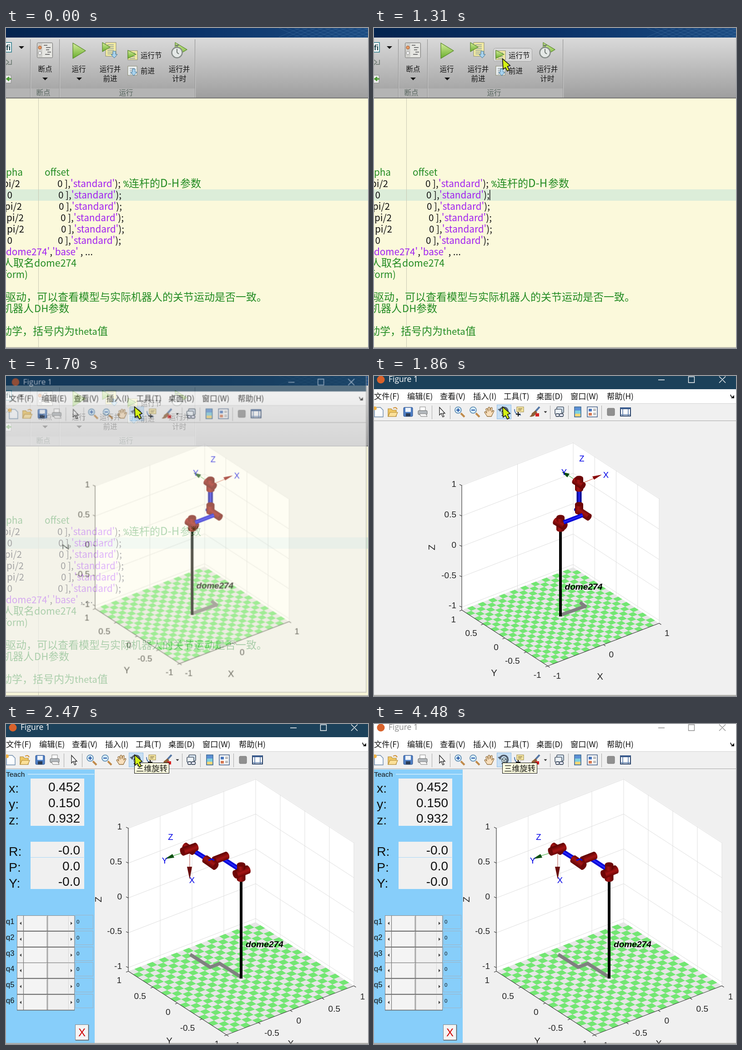
These frames come from a looping animation (796 by 704 pixels, 4630 ms). An HTML page:

```html
<!DOCTYPE html>
<html lang="zh">
<head>
<meta charset="utf-8">
<title>Robot teach panel</title>
<style>
html, body { margin: 0; width: 100%; height: 100%; overflow: hidden; background: #fbf9db; }
svg { display: block; width: 796px; height: 704px; }
text { font-family: "Noto Sans CJK SC", "Noto Sans CJK", sans-serif; white-space: pre; }
.code text { font-weight: 300; }
.ar, .ar text { font-family: "Liberation Sans", Arial, sans-serif; }
.ui { font-family: "Open Sans", sans-serif; }
.mono { font-family: "Noto Sans Mono", monospace; }

.anim { animation: 4630ms step-end infinite; }
#ibeam { animation-name: ibeam; }
#arrow { animation-name: arrow; }
#hover { animation-name: hover; }
#press { animation-name: press; }
#caret { animation-name: caret; }
#fig { animation-name: open; transform-origin: 365px 320px; }
#before { animation-name: before; }
#after { animation-name: after; }
#sliders { animation-name: sliders; }
#tip { animation-name: tip; }
#inactive { animation-name: inactive; }

@keyframes ibeam {
  0% { opacity: 0; transform: translate(648px, 643px); }
  6.47% { opacity: 1; transform: translate(648px, 643px); }
  8.11% { opacity: 1; transform: translate(513px, 441px); }
  9.75% { opacity: 1; transform: translate(437px, 328px); }
  11.39% { opacity: 1; transform: translate(335px, 190px); }
  13.03%, 100% { opacity: 0; transform: translate(335px, 190px); }
}
@keyframes arrow {
  0% { opacity: 0; transform: translate(303px, 108px); }
  13.03% { opacity: 1; transform: translate(303px, 108px); }
  14.68% { opacity: 1; transform: translate(281px, 75px); }
  19.64% { opacity: 1; transform: translate(282px, 70px); }
  21.37% { opacity: 1; transform: translate(282px, 67px); }
  68.24% { opacity: 1; transform: translate(318px, 114px); }
  69.92% { opacity: 1; transform: translate(400px, 222px); }
  71.6% { opacity: 1; transform: translate(520px, 377px); }
  73.29% { opacity: 1; transform: translate(640px, 530px); }
  74.97% { opacity: 1; transform: translate(720px, 633px); }
  76.66%, 100% { opacity: 0; transform: translate(720px, 633px); }
}
@keyframes hover { 0% { opacity: 0 } 19.64% { opacity: 1 } 35.19%, 100% { opacity: 0 } }
@keyframes press { 0% { opacity: 0 } 24.61% { opacity: 1 } 28.28%, 100% { opacity: 0 } }
@keyframes caret { 0% { opacity: 0 } 24.61% { opacity: 1 } 35.19%, 100% { opacity: 0 } }
@keyframes open {
  0% { opacity: 0; transform: scale(.94); }
  35.19% { opacity: .25; transform: scale(.95); }
  36.7% { opacity: .67; transform: scale(.983); }
  38.43% { opacity: .95; transform: scale(.997); }
  40.16%, 100% { opacity: 1; transform: scale(1); }
}
@keyframes before { 0% { opacity: 1 } 41.67%, 100% { opacity: 0 } }
@keyframes after { 0% { opacity: 0 } 41.67%, 100% { opacity: 1 } }
@keyframes sliders { 0% { opacity: 0 } 43.4%, 100% { opacity: 1 } }
@keyframes tip { 0% { opacity: 0 } 53.33%, 100% { opacity: 1 } }
@keyframes inactive { 0% { opacity: 0 } 96.75%, 100% { opacity: 1 } }
</style>
</head>
<body>
<svg id="stage" viewBox="0 0 796 704">
  <defs>
    <linearGradient id="sky"><stop offset="0" stop-color="#04244f"/><stop offset=".5" stop-color="#0a3268"/><stop offset="1" stop-color="#1c4c82"/></linearGradient>
    <linearGradient id="ribbon" x2="0" y2="1"><stop offset="0" stop-color="#dadada"/><stop offset="1" stop-color="#9e9e9e"/></linearGradient>
    <linearGradient id="leaf" x2="0" y2="1"><stop offset="0" stop-color="#d6ee9c"/><stop offset="1" stop-color="#68ad2c"/></linearGradient>
    <linearGradient id="tube" x2="0" y2="1"><stop offset="0" stop-color="#6a0404"/><stop offset=".4" stop-color="#a31414"/><stop offset="1" stop-color="#5c0202"/></linearGradient>
  </defs>
  <g id="editor"></g>
  <g id="fig" class="anim"></g>
  <g id="ibeam" class="anim"><path d="M-8-14H-2L0-12 2-14H8M0-12V12M-8 14H-2L0 12 2 14H8" fill="none" stroke="#222" stroke-width="2"/></g>
  <g id="arrow" class="anim"><path d="M.5.5 2 24 7 20 11 28 15.5 25.5 11.5 17.5 17.5 15.5Z" fill="#d3f014" stroke="#111" stroke-width="1.6" stroke-linejoin="round"/></g>
</svg>
<script>
const $ = id => document.getElementById(id);
const rect = (x, y, w, h, fill, more = '') => `<rect x="${x}" y="${y}" width="${w}" height="${h}" fill="${fill}" ${more}/>`;
const path = (d, stroke, w = 1, fill = 'none', more = '') => `<path d="${d}" fill="${fill}" stroke="${stroke}" stroke-width="${w}" ${more}/>`;
const fill = (d, color) => path(d, 'none', 0, color);
const dot = (x, y, r, color, more = '') => `<circle cx="${x}" cy="${y}" r="${r}" fill="${color}" ${more}/>`;
const text = (x, y, s, size, color = '#111', more = '') => `<text x="${x}" y="${y}" font-size="${size}" fill="${color}" ${more}>${s}</text>`;
const group = (id, body, more = '') => `<g id="${id}" class="anim ${more}">${body}</g>`;
const move = (x, y, body) => `<g transform="translate(${x} ${y})">${body}</g>`;
const MID = 'text-anchor="middle"', END = 'text-anchor="end"';
const GREEN = '#228b22', PURPLE = '#a020f0', NAME = 'dome274';

// ---- editor window ----
const play = (x, y, w, h) => path(`M${x} ${y}l${w} ${h / 2}l${-w} ${h / 2}z`, '#5b8a2c', 1.3, 'url(#leaf)', 'stroke-linejoin="round"');
const down = (x, y) => fill(`M${x - 6} ${y - 3}h12l-6 6z`, '#111');
const page = (x, y, w, h, color) => {
  let lines = '';
  for (let i = 5; i < h - 2; i += 4) lines += `M${x + 4} ${y + i}h${w - 9}`;
  return rect(x, y, w, h, color, 'stroke="#8a8a70"') + path(lines, '#8d9aa0', 1.4);
};
const dive = (x, y) => path(`M${x - 3} ${y - 8}h6v7h4l-7 8l-7-8h4z`, '#3f7396', 1, '#a9d3ee');

function ribbon() {
  let s = rect(0, 0, 796, 21, 'url(#sky)');
  let net = '';
  for (let x = 600; x < 800; x += 17) net += `M${x} 20l46-20M${x} 0l46 20`;
  s += path(net, '#8db8e0', .7, 'none', 'opacity=".25"');
  s += rect(0, 21, 796, 133, 'url(#ribbon)') + rect(0, 133, 415, 20, '#b4b4b4');
  s += path('M53.5 25V153M117.5 25V153M415.5 25V153', '#929292') + path('M54.5 25V153M118.5 25V153M416.5 25V153', '#cfcfcf');
  s += rect(0, 153, 796, 2, '#757575');

  s += rect(-12, 32, 24, 21, '#fff', 'stroke="#2f7d8c" stroke-width="1.6"') + text(0, 49, 'fi', 15, '#143c44', 'font-weight="700"');
  s += down(34, 43) + path('M0 70l6 5-6 6M12 70v10H4', '#7c8680', 2) + rect(-6, 104, 17, 17, '#eee', 'stroke="#888"');
  s += path('M12 112H4M7 108l-5 4 5 4', '#4b9a32', 3);

  s += rect(68.5, 32.5, 34, 33, '#d0d0cc', 'rx="2" stroke="#777"') + rect(80, 34, 21, 30, '#e6e6e2');
  s += dot(74.5, 43, 3.5, '#e89a62', 'stroke="#9a4a22"') + dot(74.5, 55, 3.5, '#f4f4f4', 'stroke="#888"');
  s += path('M83 38h8M88 43h10M88 48h7M91 53h8M86 58h10', '#777', 1.8);
  s += play(147, 33, 28, 34);
  s += page(219, 32, 23, 30, '#f3eca2') + play(212, 32, 17, 20) + dive(238, 59);
  s += page(268, 50, 21, 20, '#f3eca2') + play(268, 49, 18, 18);
  s += page(268, 84, 20, 20, '#edf2f4') + dive(281, 98);
  s += play(372, 32, 26, 31) + dot(376, 54, 11.5, '#e4e8e6', 'stroke="#858b88" stroke-width="2.4"');
  s += path('M376 54V46M376 54l4 3M376 42v-4M372 38h8', '#68706c', 1.8);

  const label = (x, y, t) => text(x, y, t, 15.5, '#111', MID);
  s += label(86, 96, '断点') + label(160, 96, '运行') + label(229, 96, '运行并') + label(229, 117, '前进');
  s += label(381, 96, '运行并') + label(381, 117, '计时') + down(86, 112) + down(161, 112);
  s += text(82, 148, '断点', 15.5, '#58665f', MID) + text(264, 148, '运行', 15.5, '#58665f', MID);
  const button = page(268, 50, 21, 20, '#f3eca2') + play(268, 49, 18, 18);
  const frame = c => rect(262.5, 44.5, 85, 29, c, 'rx="5" stroke="#a2a2a2"') + button;
  s += group('hover', frame('#d9d9d9')) + group('press', frame('#b9bcbd'));
  return s + text(296, 66, '运行节', 15.5) + text(296, 100, '前进', 15.5);
}

function code() {
  const latin = (x, y, t, c = '#111', more = '') => text(x, y, t, 20.7, c, more);
  const han = (x, y, t) => text(x, y, t, 23, GREEN);
  let s = rect(0, 155, 796, 549, '#fbf9db') + rect(0, 355, 796, 25, '#dcedd9');
  s += path('M71.5 155V702', '#c9c8b4') + rect(0, 702, 796, 2, '#b9b8ad');
  s += latin(37, 325, 'alpha', GREEN, END) + latin(85, 325, 'offset', GREEN);
  const rows = [['pi/2', 31, 113], ['0', 14, 115], ['pi/2', 35, 116], ['pi/2', 39, 120], ['pi/2', 40, 121], ['0', 14, 114]];
  rows.forEach(([a, end, x], i) => {
    s += latin(end, 350 + 25 * i, a, '#111', END);
    s += latin(x, 350 + 25 * i, `0 ],<tspan fill="${PURPLE}">'standard'</tspan>);`);
  });
  s += text(258, 350, '%', 20.5, GREEN, 'class="mono"') + han(270, 350, '连杆的') + text(339, 350, 'D-H', 24, GREEN) + han(383, 350, '参数');
  s += latin(0, 500, `<tspan fill="${PURPLE}">${NAME}'</tspan>,<tspan fill="${PURPLE}">'base'</tspan> , ...`);
  s += han(-7, 525, '人取名') + text(62, 525, NAME, 21.3, GREEN) + latin(48, 550, 'transform)', GREEN, END);
  s += han(-1, 600, '驱动，可以查看模型与实际机器人的关节运动是否一致。');
  s += han(-8, 625, '机器人') + text(62, 625, 'DH', 22, GREEN) + han(93, 625, '参数');
  s += han(-10, 675, '动学，括号内为') + text(151, 675, 'theta', 20.3, GREEN) + han(201, 675, '值');
  return `<g class="code">${s}</g>` + group('caret', rect(254, 356, 1.5, 23, '#111'));
}

// ---- figure window ----
const title = (bg, ink) => rect(-20, -14, 820, 43, bg) + dot(15, 8, 8.5, '#d9622b')
  + text(32, 13, 'Figure 1', 17.5, ink, 'class="ui"')
  + path('M625 8.5h14M691.5 1.5h13v13h-13zM759 1l14 14M773 1l-14 14', ink, 1.3);

const lens = sign => path('M4 4l8 8', '#c08a4a', 4) + dot(-2, -3, 7, '#d4ecfa', 'stroke="#5a88ae" stroke-width="1.6"')
  + path(sign, '#1e4fa0', 2);

function tools() {
  let s = path('M127.5 65V95M167.5 65V95M387.5 65V95M427.5 65V95M500.5 65V95', '#a9a9a9');
  const ink = '#4d5a6a';
  s += move(10, 79, path('M-9-10H4l6 6V11H-9z', '#6e8bab', 1.4, '#fbfdff') + dot(-8, -8, 4, '#f0b347'));
  s += move(41, 79, path('M-10 10V-7h7l2 3H8v14z', '#b48a35', 1.2, '#f0c864') + path('M-10 10l4-9h17l-4 9z', '#b48a35', 1.2, '#fbe09a') + path('M1-8q6-4 9 2', '#cf8b2c', 2));
  s += move(75, 79, rect(-10, -10, 20, 20, '#4f7fc4', 'rx="2" stroke="#284e8c"') + rect(-6, -9, 12, 9, '#eef4fb') + rect(-5, 3, 10, 7, '#2b3d58'));
  s += move(107, 79, rect(-6, -11, 12, 10, '#fff', 'stroke="#888"') + rect(-10, -3, 20, 9, '#b4b9bd', 'rx="2" stroke="#666"') + path('M-7 4H7l3 6h-14z', '#777', 1, '#f7f7f7'));
  s += move(149, 79, path('M-5-10V7l4-4 3 8 3-1-3-7h5z', '#222', 1.3, '#fff'));
  s += move(187, 78, lens('M-6-3h8M-2-7v8')) + move(220, 78, lens('M-6-3h8'));
  s += move(253, 79, path('M-4 10l-6-9q1-3 4 0l1 2-2-9q2-3 4 0l1 5V-9q2-3 4 0v7l2-7q3-2 3 1l-1 8 3-3q3 0 1 3l-5 10z', '#94703f', 1.3, '#f8dfbd'));
  s += rect(270.5, 63.5, 31, 31, '#c7dff4', 'stroke="#8fbce4"');
  s += move(285, 79, path('M-4 7A9 9 0 1 0-8-4', ink, 3.4) + fill('M-13-6l9-2-3 8z', ink) + path('M-4-2l5-3 5 3v5l-5 3-5-3zM1 1v5M-4-2l5 3 5-3', '#455', 1.2, '#dbe5ec'));
  s += move(319, 79, rect(-5, -11, 15, 11, '#f6e7a4', 'stroke="#9c8740"') + path('M-2-7H7M-2-4H5', '#8a7b4b', 1.3) + path('M-10-6q0 12 14 13', '#3566a8', 1.6) + path('M-7 5H3M-2 0v10', '#111', 2));
  s += move(353, 79, path('M11-11L1 0', '#5577a5', 4) + fill('M2-3l4 4-7 8q-7 3-10 1q5-3 5-7z', '#8c6038') + rect(2, 3, 8, 7, '#d42020'));
  s += fill('M373.5 77.5h7l-3.5 4z', '#333');
  s += move(407, 79, rect(-5, -11, 15, 13, '#dbe8f5', `rx="2" stroke="${ink}" stroke-width="1.6"`) + rect(-9, -6, 15, 11, '#eef4fa', `rx="2" stroke="${ink}" stroke-width="1.6"`)
    + path('M-6 4h5q3 3 0 6h-5q-3-3 0-6M2 4h6q3 3 0 6H2q-3-3 0-6', ink, 1.8, '#eef'));
  s += move(448, 79, rect(-7, -11, 14, 22, '#7fd0df', 'stroke="#335f91" stroke-width="1.5"') + rect(-6, -10, 12, 7, '#5b8fd6') + rect(-6, 4, 12, 6, '#f5d675'));
  s += move(480, 79, rect(-11, -11, 22, 22, '#fdfdfd', 'stroke="#445f86" stroke-width="1.5"') + rect(-8, -7, 7, 6, '#4a76bc') + rect(-8, 2, 7, 6, '#d77a55') + path('M2-6h6M2-3h6M2 3h6M2 6h6', '#888', 1.3));
  s += move(521, 79, rect(-8, -8, 16, 16, '#909090', 'rx="2" stroke="#777"'));
  return s + move(553, 79, rect(-11, -9, 22, 18, '#fff', 'stroke="#2d456b" stroke-width="2"') + rect(-11, -10, 22, 4, '#3b5c8e') + path('M-6-6V8M6-6V8M-10 6H10', '#5779a8', 1.6));
}

function chrome() {
  let s = rect(-20, -14, 820, 717, '#f0f0f0') + rect(-20, 28, 820, 32, '#fff') + title('#1c415a', '#fff');
  s += path('M-20 60.5H800', '#d4d4d4') + path('M-20 98.5H800', '#a6a6a6');
  const menu = { 0: '文件(F)', 73: '编辑(E)', 145: '查看(V)', 218: '插入(I)', 285: '工具(T)', 357: '桌面(D)', 432: '窗口(W)', 512: '帮助(H)' };
  for (const x in menu) s += text(x, 51, menu[x], 17.3);
  s += path('M784 41q1 6 6 6', '#111', 1.6) + fill('M792 42v7h-7z', '#111');
  return s + tools();
}

// ---- robot plot ----
function cyl(x1, y1, x2, y2, w) {
  const a = Math.atan2(y2 - y1, x2 - x1) * 180 / Math.PI, len = Math.hypot(x2 - x1, y2 - y1);
  const cap = (x, c) => `<ellipse cx="${x}" cy="0" rx="${w * .27}" ry="${w / 2}" fill="${c}"/>`;
  return `<g transform="translate(${x1} ${y1}) rotate(${a})">` + cap(0, 'url(#tube)') + rect(0, -w / 2, len, w, 'url(#tube)') + cap(len, '#6e0606') + '</g>';
}
const link = (d, w, c = '#0808d8') => path(d, c, w) + path(d, '#2c2cff', w * .25);

function plot({ L, F, R, h, step, nx, zEnd, yAt, yBy, xAt, xBy, names }) {
  const at = (u, v, z = 0) => [F[0] + u * (R[0] - F[0]) + v * (L[0] - F[0]), F[1] + u * (R[1] - F[1]) + v * (L[1] - F[1]) - z].map(n => +n.toFixed(1));
  const poly = (...p) => 'M' + p.join('L');
  let s = fill(poly(at(0, 1), at(1, 1), at(1, 0), at(1, 0, h), at(1, 1, h), at(0, 1, h)), '#fff');
  let grid = poly(at(1, 1), at(1, 1, h)), ticks = '', labels = '', tiles = '';
  for (let i = 0; i < nx; i++) grid += poly(at(i / nx, 1), at(i / nx, 1, h));
  for (let j = 0; j < 4; j++) grid += poly(at(1, j / 4), at(1, j / 4, h));
  const lab = (x, y, t, more) => text(x, y + 6.8, t, 19, '#262626', more);
  for (let k = 0; k < 5; k++) {
    const z = h - 1 - step * k, v = 1 - k / 2;
    grid += poly(at(0, 1, z), at(1, 1, z), at(1, 0, z));
    ticks += poly(at(0, 1, z)) + 'l-5-2.5' + poly(at(0, 1 - k / 4)) + 'l-5 2';
    labels += lab(zEnd, L[1] - z - 4, v, END) + lab(yAt[0] + k * yBy[0], yAt[1] + k * yBy[1], v, END);
  }
  for (let i = 0; i <= nx; i++) {
    ticks += poly(at(i / nx, 0)) + 'l4.5 3';
    labels += lab(xAt[0] + i * xBy[0], xAt[1] + i * xBy[1], 2 * i / nx - 1);
  }
  const n = 21;
  for (let i = 0; i < n; i++) for (let j = 0; j < n; j++) if ((i + j) % 2)
    tiles += poly(at(i / n, j / n), at((i + 1) / n, j / n), at((i + 1) / n, (j + 1) / n), at(i / n, (j + 1) / n)) + 'z';
  s += path(grid, '#dedede') + fill(poly(at(0, 0), at(1, 0), at(1, 1), at(0, 1)), '#e6e6e6') + fill(tiles, '#73e673');
  s += path(poly(at(0, 1, h), at(0, 1), at(0, 0), at(1, 0)) + ticks, '#333', 1.1) + labels;
  const [X, Y, Z] = names;
  s += text(X[0], X[1] + 7, 'X', 20.5, '#262626', MID) + text(Y[0], Y[1] + 7, 'Y', 20.5, '#262626', MID);
  return s + `<text transform="translate(${Z[0] + 7} ${Z[1]}) rotate(-90)" font-size="20.5" fill="#262626" ${MID}>Z</text>`;
}
const mark = (x, y, t) => text(x, y + 6.5, t, 18.5, '#0000e6', MID);
const tag = (x, y) => text(x, y, NAME, 19.1, '#000', 'font-weight="700" font-style="italic"');

function upright() {
  let s = plot({ L: [193, 515], F: [382, 638], R: [627, 544], h: 275, step: 66.9, nx: 2, zEnd: 181,
    yAt: [180, 535], yBy: [46.9, 30.5], xAt: [394, 659], xBy: [122.5, -47], names: [[497, 661], [264, 653], [127, 377]] });
  s += path('M410 526L463 507M467 509L453 498', '#808080', 7.5) + path('M410 335V529', '#000', 6);
  s += path('M460 235L484 225', '#c83c1e') + fill('M480 221l21-4-17 11z', '#8a0808');
  s += path('M438 226L428 219', '#20a020') + fill('M413 211l17 4-5 8z', '#0a4a10');
  s += cyl(410, 338, 410, 311, 18) + cyl(399, 319, 420, 331, 17) + cyl(410, 318, 410, 310, 17);
  s += dot(444, 294, 4, '#0606b0') + link('M451 250V280', 11, '#00009a') + cyl(451, 300, 451, 282, 18) + cyl(453, 298, 473, 311, 16);
  s += link('M417 322L459 306', 9);
  s += cyl(451, 250, 451, 225, 18) + cyl(441, 230, 460, 242, 16) + cyl(451, 231, 451, 224, 17);
  return s + mark(510, 217, 'X') + mark(418, 211, 'Y') + mark(457, 181, 'Z') + tag(419.5, 470);
}

function reaching() {
  let s = plot({ L: [269, 544], F: [485, 684], R: [765, 576], h: 315.5, step: 76.6, nx: 4, zEnd: 255,
    yAt: [254, 563], yBy: [53.8, 35], xAt: [498, 706], xBy: [70.2, -26.7], names: [[626, 703], [359, 697], [203, 386]] });
  s += path('M405 507L449 535L470 527L517 557', '#808080', 7.5) + path('M517 340V560', '#000', 6);
  s += cyl(517, 342, 517, 310, 19) + link('M512 319L472 293', 10);
  s += cyl(532, 320, 504, 331, 19) + cyl(517, 318, 517, 309, 18);
  s += link('M443 298L408 276', 10) + cyl(486, 289, 458, 300, 17) + cyl(438, 297, 461, 313, 18) + path('M445 300l8-3 5 3', '#0c0cd8', 3);
  s += path('M404 285V314', '#b05048') + fill('M398 314h11l-5 28z', '#6a0c0c');
  s += path('M390 283L367 290', '#20a020') + fill('M349 297l17-11 4 8z', '#0a5010');
  s += cyl(393, 268, 412, 281, 16) + cyl(418, 270, 388, 281, 18);
  return s + mark(409, 343, 'X') + mark(349, 300, 'Y') + mark(362, 248, 'Z') + tag(527, 491);
}

// ---- teach panel ----
function panel() {
  let s = rect(0, 100, 195, 602, '#87cefa') + text(0, 116, 'Teach', 15.5) + path('M48 110.5H194', '#d8eefc', 1.5);
  const block = (y, rows) => {
    s += rect(54, y, 118, 104, '#f0f0f0');
    rows.forEach(([k, v], i) => {
      s += text(6, y + 31 + 35 * i, k, 28.5) + text(163, y + 28 + 34.6 * i, v, 28, '#111', END);
    });
  };
  block(120, [['x:', '0.452'], ['y:', '0.150'], ['z:', '0.932']]);
  block(259, [['R:', '-0.0'], ['P:', '0.0'], ['Y:', '-0.0']]);
  return s + path('M54 293.5H171', '#a9d8f6');
}

function sliders() {
  let s = '';
  for (let i = 0; i < 6; i++) {
    const y = Math.round(421 + 34.8 * i);
    s += move(0, y, text(0, 18.5, 'q' + (i + 1), 16.5) + rect(24.5, .5, 126, 34, '#f0f0f0', 'stroke="#8a8a8a"')
      + rect(39, 2, 50, 31, '#f4f4f4') + path('M137.5 2V33', '#d8d8d8') + path('M38.5 1V34M91.5 1V34', '#777', 1.2) + path('M89.5 2V34', '#aaa') + path('M24 34.5H151', '#666', 1.6)
      + fill('M34 14v7l-4-3.5zM142 14v7l4-3.5z', '#444') + rect(152.5, -.5, 39, 30, '#87cefa', 'stroke="#9fb4c4"') + text(155, 18, '0', 11.5));
  }
  return s + rect(152.5, 661.5, 29, 34, '#f4f4f4', 'stroke="#888"') + path('M153 695.5H181.5V662', '#555', 1.5) + text(167, 687, 'X', 24, '#d00000', MID);
}

$('editor').innerHTML = code() + ribbon();
$('fig').innerHTML = chrome()
  + group('before', upright(), 'ar')
  + group('after', reaching() + panel() + group('sliders', sliders()), 'ar')
  + path('M-20 702.5H799.5V-14', '#a4a4a4', 1.5)
  + group('tip', rect(282.5, 85.5, 76, 23, '#ffffe1', 'stroke="#111"') + text(286, 103.5, '三维旋转', 17.3))
  + group('inactive', title('#fff', '#8c8c8c'));
</script>
</body>
</html>
```
